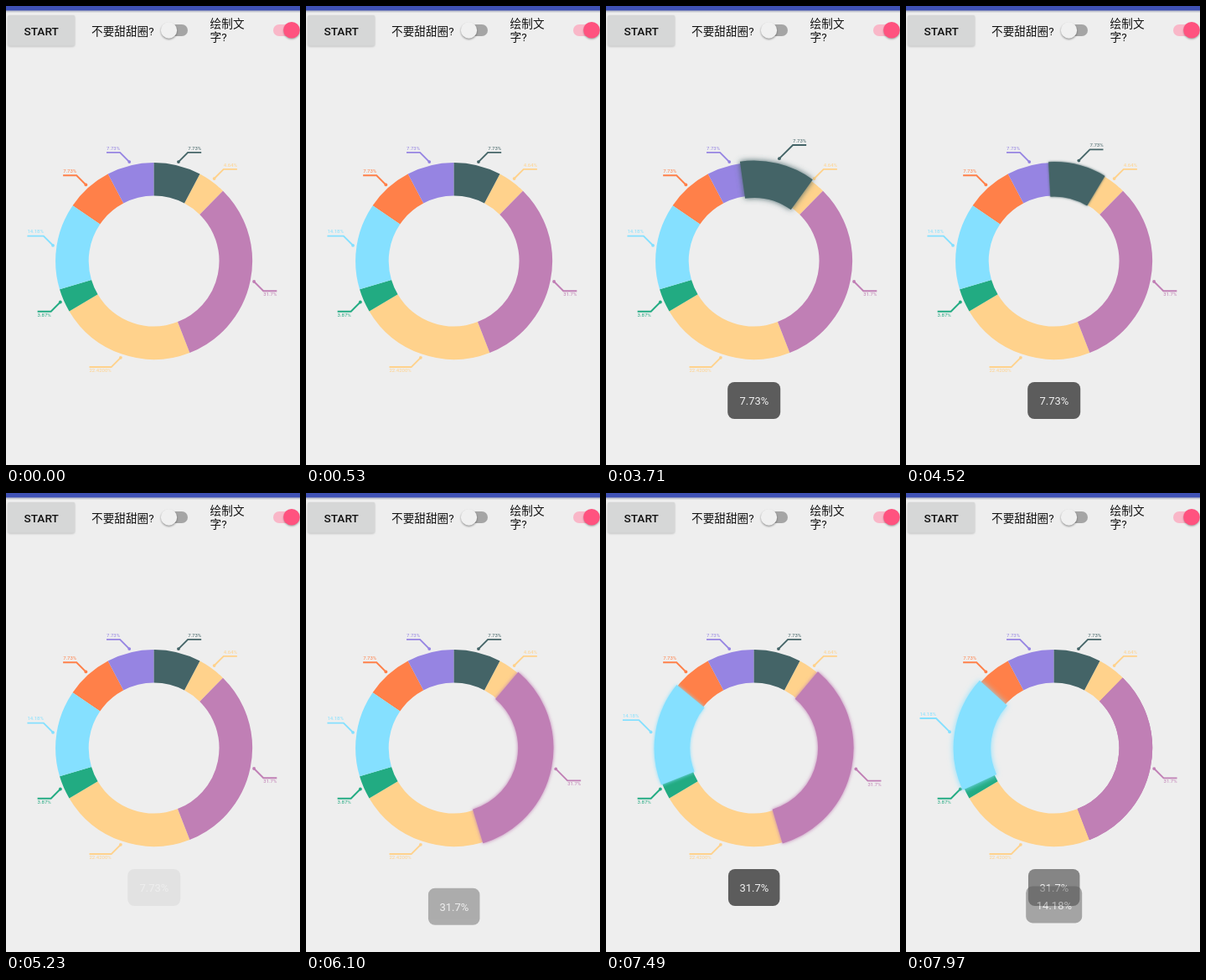
Write an HTML page that moves like this. It is 351 px wide and 548 px high and loops after 8000 ms.

```html
<!DOCTYPE html>
<html lang="zh">
<head>
<meta charset="utf-8">
<title>Donut chart</title>
<style>
  html, body { margin: 0; width: 100%; height: 100%; overflow: hidden; background: #eee; }
  svg { display: block; width: 351px; height: 548px; font-family: Roboto, "Noto Sans CJK SC", "Noto Sans CJK", sans-serif; }
  .ui { font-size: 13.65px; fill: #111; }
  .label { font-size: 6px; }
  .toast { font-size: 13px; fill: #f2f2f2; text-anchor: middle; }
</style>
</head>
<body>
<svg id="stage" viewBox="0 0 351 548" xmlns="http://www.w3.org/2000/svg">
  <defs>
    <linearGradient id="edge" x2="0" y2="1">
      <stop offset="0" stop-color="#a9adbd"/>
      <stop offset="1" stop-color="#eee"/>
    </linearGradient>
    <filter id="soft" x="-30%" y="-30%" width="160%" height="160%">
      <feGaussianBlur stdDeviation="1"/>
    </filter>
  </defs>
  <rect width="351" height="548" fill="#eee"/>
  <rect y="5" width="351" height="3.5" fill="url(#edge)"/>
  <rect width="351" height="5.4" fill="#3f51b5"/>

  <rect x="2.3" y="12" width="79.6" height="36.5" rx="2" fill="#999" opacity=".6" filter="url(#soft)"/>
  <rect x="2" y="11" width="80.2" height="36.8" rx="1.5" fill="#d6d7d7"/>
  <text class="ui" x="21.6" y="34.5" font-weight="500">START</text>

  <text class="ui" x="102" y="34.5">不要甜甜圈?</text>
  <rect x="188" y="22" width="29" height="14" rx="7" fill="#a5a5a5"/>
  <circle cx="194.5" cy="30.3" r="9.6" opacity=".4" filter="url(#soft)"/>
  <circle cx="194.5" cy="29" r="9.7" fill="#f0f0f0"/>

  <text class="ui" x="243.6" y="26">绘制文</text>
  <text class="ui" x="243.6" y="42.3">字?</text>
  <rect x="319" y="22" width="29" height="14" rx="7" fill="#f9b7c8"/>
  <circle cx="341" cy="30" r="9.6" opacity=".35" filter="url(#soft)"/>
  <circle cx="341" cy="28.7" r="9.8" fill="#ff527f"/>

  <g id="chart"></g>
  <g id="toasts"></g>
</svg>
<script>
const LOOP = 8000, CX = 176.6, CY = 304.5, RADIUS = 97.7, BAND = 39.6;
const UP = 500, DOWN = 800, ENTER = 200, EXIT = 205;

// share in percent, colour, label, start of rise, start of fall
const slices = [
  [7.73, '#446467', '7.73%', 3100, 4220],
  [4.64, '#ffd28c', '4.64%'],
  [31.7, '#c07fb5', '31.7%', 5940, 7300],
  [22.42, '#ffd28c', '22.4200%'],
  [3.87, '#22ab82', '3.87%'],
  [14.18, '#85e0ff', '14.18%', 7300, 9000],
  [7.73, '#ff8049', '7.73%'],
  [7.73, '#9684e2', '7.73%']
];
// text, box width, enter, exit, removal
const toasts = [
  ['7.73%', 63, 3190, 5040, 5960],
  ['31.7%', 61.5, 6050, 7912, 8200],
  ['14.18%', 67, 7912, 9000, 9500]
];

const chart = document.getElementById('chart');
const toastLayer = document.getElementById('toasts');
const clamp = v => Math.max(0, Math.min(1, v));
const decelerate = v => 1 - (1 - clamp(v)) ** 2;

function add(parent, tag, attrs = {}, text) {
  const el = document.createElementNS('http://www.w3.org/2000/svg', tag);
  set(el, attrs);
  if (text) el.textContent = text;
  return parent.appendChild(el);
}
function set(el, attrs) {
  for (const k in attrs) el.setAttribute(k, attrs[k]);
}
function polar(deg, r) {
  const a = deg * Math.PI / 180;
  return [CX + r * Math.sin(a), CY - r * Math.cos(a)];
}
function arc(from, to) {
  return `M${polar(from, RADIUS)}A${RADIUS} ${RADIUS} 0 ${to - from > 180 ? 1 : 0} 1 ${polar(to, RADIUS)}`;
}

function makeSlice([share, color, name, rise, fall], from, index) {
  const to = from + share * 3.6, mid = (from + to) / 2;
  const g = add(chart, 'g');
  let blur, shadow;
  if (rise) {
    const filter = add(g, 'filter', { id: 'glow' + index, filterUnits: 'userSpaceOnUse', x: 0, y: 0, width: 351, height: 548 });
    blur = add(filter, 'feGaussianBlur', { stdDeviation: 0 });
    shadow = add(g, 'path', { fill: 'none', stroke: color, filter: `url(#glow${index})` });
  }
  const band = add(g, 'path', { fill: 'none', stroke: color });
  const line = add(g, 'path', { fill: 'none', stroke: color, 'stroke-width': 1.9 });
  const dot = add(g, 'circle', { r: 1.9, fill: color });
  const label = add(g, 'text', { class: 'label', fill: color }, name);
  const digits = name.length - 2;
  const width = 6 * (digits * 0.5615 + 0.99);

  function pose(p) {
    const shape = { d: arc(from - 8 * p, to + 8 * p), 'stroke-width': BAND + 5 * p };
    set(band, shape);
    if (shadow) {
      set(shadow, shape);
      set(blur, { stdDeviation: Math.max(0.01, 3.5 * p) });
      shadow.style.display = p > 0 ? '' : 'none';
    }
    const [x, y] = polar(mid, 122 + 4 * p);
    const sx = mid < 180 ? 1 : -1, sy = mid > 90 && mid < 270 ? 1 : -1;
    const reach = 11.2 + 5 * p;
    const ex = x + sx * reach, ey = y + sy * reach;
    set(dot, { cx: x, cy: y });
    set(line, { d: `M${x} ${y}L${ex} ${ey}h${sx * width}` });
    set(label, { x: sx > 0 ? ex : ex - width, y: sy > 0 ? ey + 6 : ey - 3.2 });
  }
  pose(0);
  return { g, rise, pose, at: t => decelerate((t - rise) / UP) * (1 - decelerate((t - fall) / DOWN)) };
}

let angle = 0;
const floating = slices.map((s, i) => {
  const slice = makeSlice(s, angle, i);
  angle += s[0] * 3.6;
  return slice;
}).filter(s => s.rise);
floating.forEach(s => chart.append(s.g));

const popups = toasts.map(([text, width, enter, exit, gone]) => {
  const g = add(toastLayer, 'g');
  add(g, 'rect', { x: 176.7 - width / 2, y: 449, width, height: 44, rx: 8, fill: '#5c5c5c' });
  add(g, 'text', { class: 'toast', x: 176.9, y: 476.2 }, text);
  return { g, enter, exit, gone };
});

function draw(t) {
  floating.forEach(s => s.pose(s.at(t)));
  for (const { g, enter, exit, gone } of popups) {
    const shown = decelerate((t - enter) / ENTER);
    // the fading box leaves a faint trace until it is removed
    const left = Math.max(0.075, 1 - clamp((t - exit) / EXIT));
    set(g, {
      opacity: t < gone ? shown * left : 0,
      transform: `translate(0 ${41 * (1 - shown)})`
    });
  }
}

const start = performance.now();
function tick() {
  draw((performance.now() - start) % LOOP);
  requestAnimationFrame(tick);
}
tick();
</script>
</body>
</html>
```
